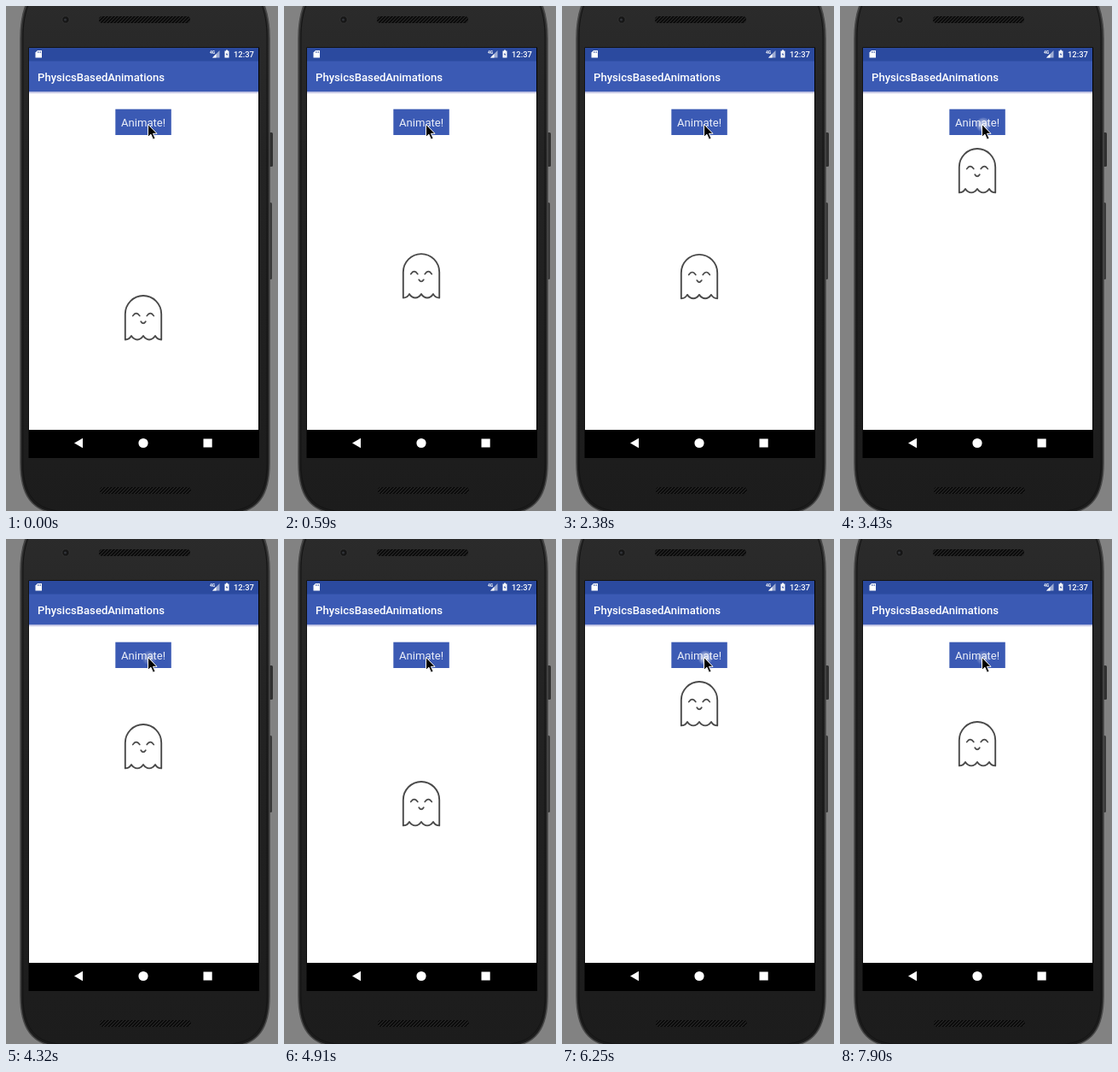
An HTML page for the animation above (8000 ms loop, 319 by 591 pixels).

```html
<!DOCTYPE html>
<html lang="en">
<head>
<meta charset="utf-8">
<title>Spring animation</title>
<style>
  html, body { margin: 0; width: 100%; height: 100%; overflow: hidden; background: #828282; }
  svg { display: block; width: 100vw; height: 100vh; }
  text { font-family: Roboto, sans-serif; fill: #fff; }
</style>
</head>
<body>
<svg viewBox="0 0 319 591" preserveAspectRatio="none">
  <defs>
    <linearGradient id="body" x1="0" y1="0" x2="0" y2="1">
      <stop offset="0" stop-color="#2b2b2b"/>
      <stop offset=".3" stop-color="#232323"/>
      <stop offset="1" stop-color="#1c1c1c"/>
    </linearGradient>
    <linearGradient id="shade" x1="0" y1="0" x2="0" y2="1">
      <stop offset="0" stop-color="#b3b3dc"/>
      <stop offset="1" stop-color="#fff"/>
    </linearGradient>
    <radialGradient id="glow">
      <stop offset="0" stop-color="#fff" stop-opacity=".9"/>
      <stop offset=".5" stop-color="#fff" stop-opacity=".65"/>
      <stop offset="1" stop-color="#fff" stop-opacity="0"/>
    </radialGradient>
    <pattern id="mesh" width="4" height="4" patternUnits="userSpaceOnUse">
      <path d="M0 4L4 0M-1 1L1 -1M3 5L5 3" stroke="#2c2c2c" stroke-width="1"/>
    </pattern>
    <g id="speaker">
      <rect width="107" height="8" rx="4" fill="#0d0d0d"/>
      <rect width="107" height="8" rx="4" fill="url(#mesh)"/>
    </g>
  </defs>

  <!-- phone -->
  <rect width="319" height="591" fill="#828282"/>
  <rect x="307" y="148" width="6" height="40" rx="1.5" fill="#303030"/>
  <rect x="307" y="230" width="5" height="90" rx="1.5" fill="#3a3a3a"/>
  <path d="M25 -6C19 8 17 20 17 38V535C17 572 30 592 62 594H264C296 592 309 572 309 535V38C309 20 307 8 301 -6Z"
        fill="url(#body)" stroke="#484848" stroke-width="1.6"/>
  <path d="M28 -6C22 8 20 20 20 38V535C20 570 33 588 62 591H264C293 588 306 570 306 535V38C306 20 304 8 298 -6"
        fill="none" stroke="#141414" stroke-width="1"/>
  <circle cx="70" cy="16" r="4.2" fill="#161616" stroke="#383838" stroke-width=".8"/>
  <circle cx="69.5" cy="16" r="1.6" fill="#303338"/>
  <use href="#speaker" x="109" y="12"/>
  <use href="#speaker" x="110" y="563"/>

  <!-- screen -->
  <rect x="26.5" y="48.5" width="270.5" height="480.5" fill="#000"/>
  <rect x="27" y="100" width="269" height="396" fill="#fff"/>
  <rect x="27" y="49" width="269" height="16" fill="#2b4a9f"/>
  <rect x="27" y="64.5" width="269" height="36" fill="#3b5ab4"/>
  <rect x="27" y="100.5" width="269" height="2.5" fill="url(#shade)"/>
  <text x="37" y="87.7" font-size="13.1" font-weight="500">PhysicsBasedAnimations</text>

  <!-- status bar -->
  <path d="M37 52H42V60.5H34.5V54.5Z" fill="#fff"/>
  <path d="M37.5 53V55M39 53V55M40.5 53V55" stroke="#2b4a9f" stroke-width=".6"/>
  <text x="239" y="56" font-size="5" font-weight="700">4G</text>
  <path d="M250.5 52V60.5H242Z" fill="#fff" fill-opacity=".55"/>
  <path d="M246.5 56V60.5H242Z" fill="#fff"/>
  <path d="M258 51.5H260V52.5H261.5V60.5H256.5V52.5H258Z" fill="#fff"/>
  <path d="M259.5 54L257.8 57H259L258.6 59.2L260.3 56.2H259.1Z" fill="#2b4a9f"/>
  <text x="267" y="60.3" font-size="9.4" font-weight="500">12:37</text>

  <!-- navigation bar -->
  <g fill="#fff">
    <path d="M80 511.5L90 505.8V517.2Z"/>
    <circle cx="161" cy="511.5" r="5.6"/>
    <rect x="231.5" y="506.5" width="10.2" height="10"/>
  </g>

  <!-- button -->
  <rect x="128.3" y="120.7" width="65.5" height="30.3" fill="#3b5ab4"/>
  <text x="135" y="141" font-size="13.1" style="fill:#e9edf8">Animate!</text>
  <circle id="ripple" cx="168" cy="139" r="9" fill="url(#glow)" opacity="0"/>

  <g id="ghost" fill="none" stroke="#4a4a4a" stroke-width="1.9" stroke-linecap="round" stroke-linejoin="round">
    <path d="M139.8 52.4V22.5A21.2 21.5 0 0 1 182.2 22.5V52.4Q177.6 52.4 175 48Q172 52.4 168 52.4T161 48Q158 52.4 154 52.4T147 48Q144.4 52.4 139.8 52.4Z"/>
    <path d="M148.7 24.6Q152.7 18.6 156.8 24.6M165.2 24.6Q169.3 18.6 173.3 24.6M158.2 31.2Q161 35.6 163.8 31.2" stroke-width="1.7"/>
  </g>

  <path d="M166.5 138.5V153.3L169.9 150.2L172.5 156.2L175.1 155L172.5 149.3H177Z"
        fill="#000" stroke="#fff" stroke-width="1" stroke-linejoin="round"/>
</svg>

<script>
const LOOP = 8000, TOP = 166, REST = 290.3, DAMPING = 0.2;
const ghost = document.getElementById('ghost');
const ripple = document.getElementById('ripple');

// Underdamped spring from TOP to REST; ms since release, w in rad/s.
function spring(ms, w) {
  const t = ms / 1000, root = Math.sqrt(1 - DAMPING ** 2), a = w * root * t;
  const swing = Math.cos(a) + DAMPING / root * Math.sin(a);
  return REST - (REST - TOP) * Math.exp(-DAMPING * w * t) * swing;
}

const moves = [];
function drop(times, release, w) {
  for (const t of times) moves.push([t, spring(t - release, w)]);
}
const every = (from, n) => Array.from({ length: n }, (_, i) => from + i * 150);

drop([0, ...every(140, 13), ...every(2080, 5)], -566, 7.07);
moves.push([2830, TOP], [4320, 216]);
drop([...every(4470, 3), ...every(4910, 5)], 4280, 19.3);
moves.push([5660, TOP], [7900, 213]);

const glows = [[0, 0], [3430, 0.75], [4320, 0.4], [4470, 0], [6250, 0.75], [7900, 0.4]];

function held(steps, t) {
  let value = steps[0][1];
  for (const [at, v] of steps) if (at <= t) value = v;
  return value;
}

function draw() {
  const t = performance.now() % LOOP;
  ghost.setAttribute('transform', `translate(0 ${held(moves, t).toFixed(2)})`);
  ripple.setAttribute('opacity', held(glows, t));
  requestAnimationFrame(draw);
}
draw();
</script>
</body>
</html>
```
